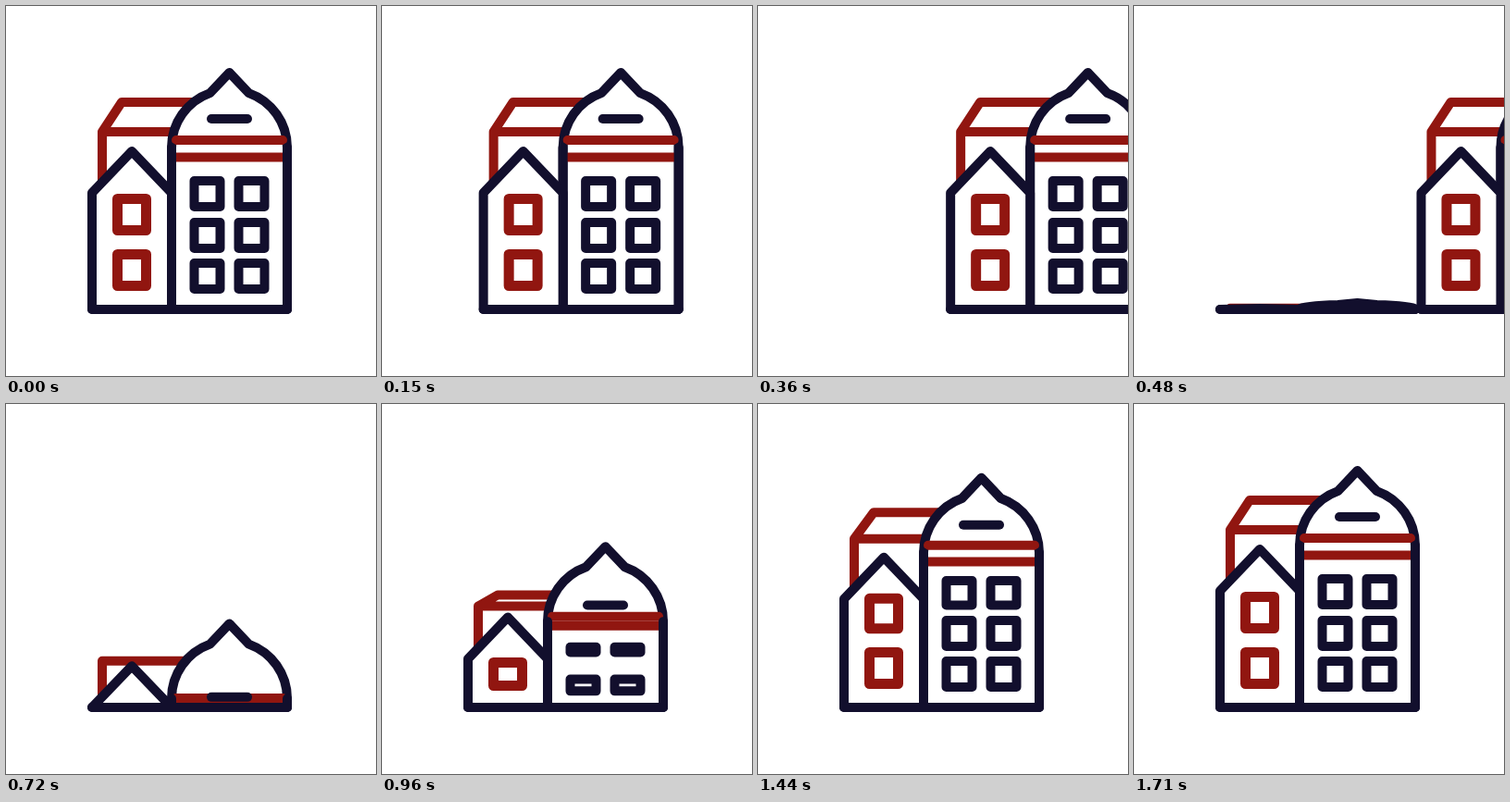
An HTML page with a canvas that plays this animation: 400 by 400 pixels, repeating every 3740 ms.

```html
<!DOCTYPE html>
<html lang="en">
<head>
<meta charset="utf-8">
<title>Buildings</title>
<style>
  html, body { margin: 0; width: 100%; height: 100%; overflow: hidden; background: #fff; }
  canvas { display: block; width: 400px; height: 400px; }
</style>
</head>
<body>
<canvas id="stage" width="400" height="400"></canvas>
<script>
const ctx = document.getElementById('stage').getContext('2d');
const LOOP = 3740, STEP = 30, END = 1700, GROUND = 328;
const NAVY = '#120f2d', RED = '#911610';

const clamp = v => Math.min(1, Math.max(0, v));
const phase = (t, start, end = END) => clamp((t - start) / (end - start));
const easeOut = (u, power) => 1 - (1 - u) ** power;

// Cubic bezier easing with handles (a, 0) and (b, 1).
function bezier(u, a, b) {
  let low = 0, high = 1;
  for (let i = 0; i < 24; i++) {
    const s = (low + high) / 2, r = 1 - s;
    if (3 * s * r * r * a + 3 * s * s * r * b + s ** 3 < u) low = s;
    else high = s;
  }
  return low * low * (3 - 2 * low);
}

const lift = (y, p) => GROUND - (GROUND - y) * p;

function draw(color, width, build, fill) {
  ctx.beginPath();
  build();
  if (fill) {
    ctx.fillStyle = '#fff';
    ctx.fill();
  }
  ctx.strokeStyle = color;
  ctx.lineWidth = width;
  ctx.stroke();
}

function trace(...points) {
  points.forEach(([x, y], i) => i ? ctx.lineTo(x, y) : ctx.moveTo(x, y));
}

function annex(t, p) {
  const eave = lift(136, p);
  const top = eave - 32 * easeOut(phase(t, 720), 1.67);
  draw(RED, 10, () => {
    trace([104, GROUND], [104, eave], [125, top], [210, top]);
    trace([104, eave], [210, eave]);
  });
}

function tower(t) {
  const height = 256 * bezier(phase(t, 400), 0.22, 0.3);
  const top = GROUND - height;
  const k = Math.min(1, height / 81);
  const base = top + 81 * k;
  const kink = Math.acos(21 / 62.5);
  draw(NAVY, 10, () => {
    ctx.moveTo(179, GROUND);
    ctx.lineTo(179, base);
    ctx.ellipse(241.5, base, 62.5, 62.5 * k, 0, Math.PI, Math.PI + kink);
    ctx.lineTo(241.5, top);
    ctx.ellipse(241.5, base, 62.5, 62.5 * k, 0, -kink, 0);
    ctx.lineTo(304, GROUND);
    ctx.closePath();
  }, true);

  const p = bezier(phase(t, 665), 0.12, 0.25);
  for (const y of [145, 163.5]) {
    draw(RED, 10, () => trace([184, lift(y, p)], [299, lift(y, p)]));
  }
  draw(NAVY, 10, () => {
    trace([179, GROUND], [179, base]);
    trace([304, GROUND], [304, base]);
  });
  draw(NAVY, 10, () => trace([222, lift(122, p)], [261, lift(122, p)]));
}

function house(p) {
  const height = 171 * p;
  const top = GROUND - height;
  const eave = top + Math.min(45, height);
  draw(NAVY, 10, () => {
    trace([93, GROUND], [93, eave], [136, top], [179, eave], [179, GROUND]);
    ctx.closePath();
  }, true);
}

function windowFrame(t, start, color, width, x, bottom, w, h) {
  if (t < start) return;
  const p = easeOut(phase(t, start, start + 600), 3);
  const y = bottom + 8 * (1 - p);
  draw(color, width, () => {
    trace([x, y], [x, y - h * p], [x + w, y - h * p], [x + w, y]);
    ctx.closePath();
  });
}

function building(t) {
  const p = bezier(phase(t, 450), 0.17, 0.46);
  annex(t, p);
  tower(t);
  house(p);
  for (const [start, bottom] of [[1050, 242.5], [743, 302.5]]) {
    windowFrame(t, start, RED, 11, 120.5, bottom, 31, 34);
  }
  for (const [start, bottom] of [[1072, 217], [917, 262], [850, 306]]) {
    for (const x of [203.5, 251.5]) {
      windowFrame(t, start, NAVY, 10, x, bottom, 28, 28);
    }
  }
  draw(NAVY, 10, () => trace([93, GROUND], [304, GROUND]));
}

function render(t) {
  ctx.fillStyle = '#fff';
  ctx.fillRect(0, 0, 400, 400);
  ctx.lineCap = ctx.lineJoin = 'round';
  if (t >= 390) building(t);
  if (t < 600) {
    ctx.save();
    ctx.translate(47 * (t / 240) ** 2.21, 0);
    building(LOOP);
    ctx.restore();
  }
}

const begin = performance.now();
function tick() {
  const t = (performance.now() - begin) % LOOP;
  render(Math.floor(t / STEP) * STEP);
  requestAnimationFrame(tick);
}
tick();
</script>
</body>
</html>
```
